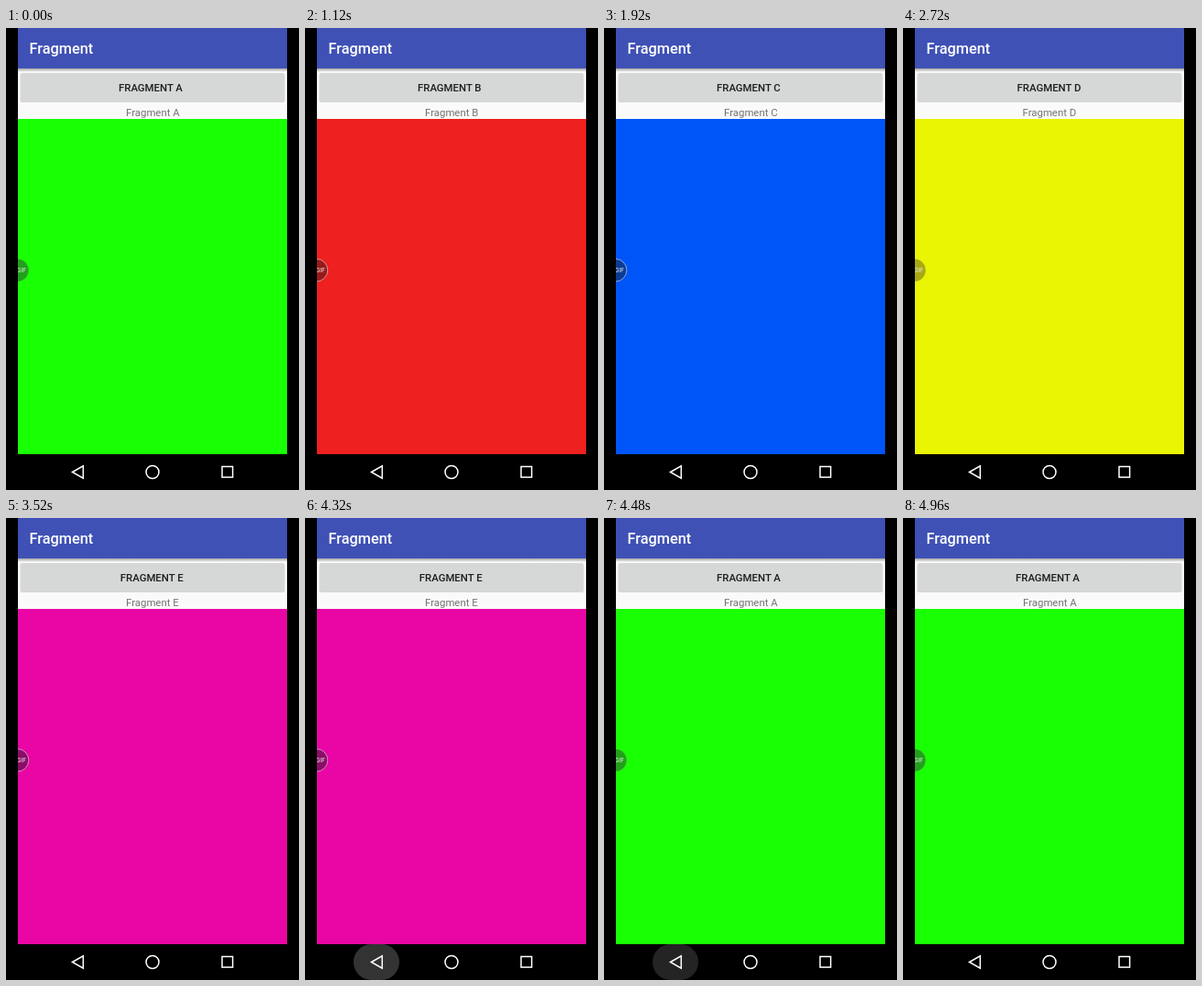
Animation, 320 px wide and 503 px high, one loop 9600 ms. Source, as an HTML page:

```html
<!DOCTYPE html>
<html lang="en">
<head>
<meta charset="utf-8">
<title>Fragment</title>
<style>
html, body { margin: 0; width: 100%; height: 100%; overflow: hidden; background: #000; }
svg { display: block; width: 100%; height: 100%; font-family: Roboto, sans-serif; }
</style>
</head>
<body>
<svg viewBox="0 0 320 503">
  <defs>
    <linearGradient id="shade" x2="0" y2="1">
      <stop stop-color="#000" stop-opacity=".35"/>
      <stop offset="1" stop-color="#000" stop-opacity="0"/>
    </linearGradient>
    <clipPath id="screen"><rect x="13" width="294" height="503"/></clipPath>
  </defs>
  <rect width="320" height="503"/>
  <rect x="13" width="294" height="100" fill="#fafafa"/>
  <rect x="13" width="294" height="44" fill="#3f51b5"/>
  <rect x="13" y="44" width="294" height="4" fill="url(#shade)"/>
  <text x="25.5" y="28" font-size="16.3" font-weight="500" fill="#fff">Fragment</text>

  <rect x="15.5" y="49.5" width="289" height="31.5" rx="2" fill="#000" opacity=".14"/>
  <rect x="16" y="49" width="288" height="31" rx="1.6" fill="#d6d7d7"/>
  <text id="button" y="68.5" font-size="11.4" font-weight="500" fill="#1d1e1e"></text>
  <text id="label" y="96" font-size="11.4" fill="#747474"></text>

  <rect id="panel" x="13" y="99" width="294" height="365"/>
  <rect id="dash" x="304" y="101" width="3" height="1" fill="#fff"/>

  <g clip-path="url(#screen)">
    <circle id="bubble" cx="12.5" cy="263.7" r="12.3" stroke="#e4e4ea" stroke-width=".8"/>
    <text x="12" y="266" font-size="6.5" fill="#eee">GIF</text>
  </g>

  <rect id="ripple" x="53" y="464" width="50" height="39" rx="19.5" fill="#fff"/>
  <g fill="none" stroke="#fff" stroke-width="1.5">
    <path d="M72.5 483.5L84.3 476.8V490.2Z"/>
    <circle cx="160" cy="483.5" r="7"/>
    <rect x="236" y="477.5" width="11.6" height="11.6"/>
  </g>
</svg>
<script>
const LOOP = 9600, STEP = 160;
// start time, letter, panel, bubble fill, bubble outline opacity, button x, label x
const pages = [
  [0, 'A', '#19ff03', '#22a01c', .15, 123, 131],
  [1120, 'B', '#ee2020', '#981a1a', .75, 123, 131],
  [1920, 'C', '#0055f9', '#0a3b95', .75, 123, 131],
  [2720, 'D', '#e9f502', '#a8aa12', .15, 124.6, 130.5],
  [3360, 'E', '#e906a5', '#8b0d68', .75, 124.8, 131],
  [4480, 'A', '#19ff03', '#22a01c', .15, 123, 131]
];
const rippleAlpha = [.2, .14, .07];
const $ = id => document.getElementById(id);
const set = (id, attrs) => {
  for (const name in attrs) $(id).setAttribute(name, attrs[name]);
};

function draw(now) {
  const t = now % LOOP;
  const [, letter, color, dark, outline, buttonX, labelX] =
    pages.filter(page => page[0] <= t).pop();
  $('button').textContent = 'FRAGMENT ' + letter;
  $('label').textContent = 'Fragment ' + letter;
  set('button', { x: buttonX });
  set('label', { x: labelX });
  set('panel', { fill: color });
  set('bubble', { fill: dark, 'stroke-opacity': outline });
  set('dash', { opacity: t >= 3360 && t < 3520 ? 1 : 0 });
  set('ripple', { opacity: rippleAlpha[Math.floor((t - 4320) / STEP)] || 0 });
}

const start = performance.now();
function tick() {
  draw(performance.now() - start);
  requestAnimationFrame(tick);
}
tick();
</script>
</body>
</html>
```
